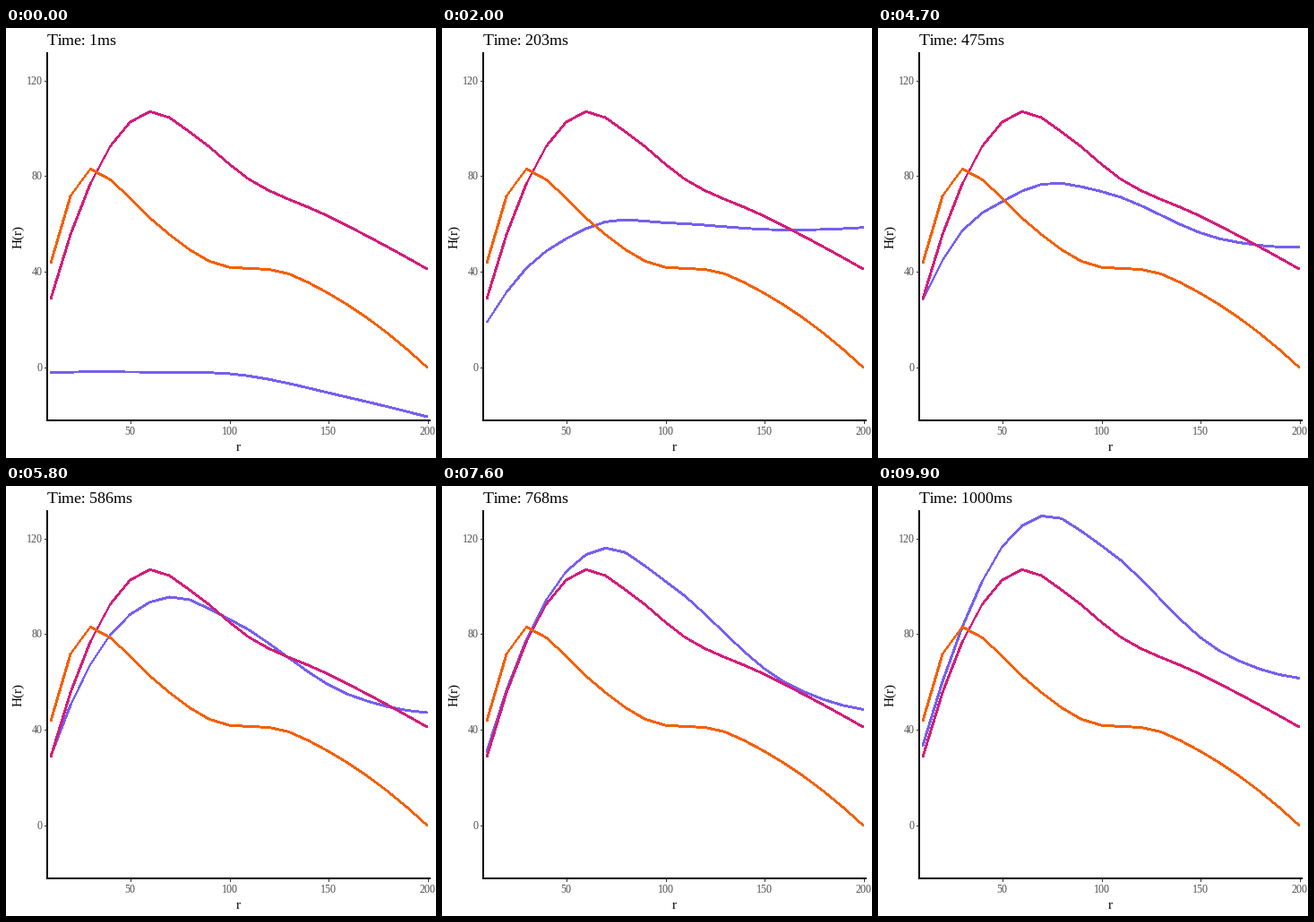
These frames come from a looping animation (480 by 480 pixels, 10000 ms). A matplotlib script:

```python
import numpy as np
import matplotlib.pyplot as plt
from matplotlib.animation import FuncAnimation
from matplotlib.collections import LineCollection

SIZE, DPI, FRAMES = 480, 80, 100
PX = 72 / DPI  # points per pixel
PINK, ORANGE, VIOLET = "#D21E7A", "#F46000", "#7560F0"

plt.rcParams.update({
    "font.family": "Liberation Serif",
    "text.hinting": "native",
    "text.hinting_factor": 1,
})

radii = np.arange(10, 201, 10)

# Key points (r, H) of the two fixed curves
pink_keys = [(10, 28.6), (20, 55.6), (40, 92.3), (60, 106.8), (80, 98.3),
             (110, 78.5), (150, 63.1), (200, 41)]
orange_keys = [(10, 43.6), (20, 71.7), (30, 82.8), (40, 78.3), (60, 62.3),
               (90, 44.2), (130, 39), (150, 30.9), (200, -0.1)]

# Violet poses: frame -> H at each knot, blended linearly in time
knots = [10, 30, 50, 70, 100, 160, 200]
poses = {
    0: [-2.4, -2, -2.1, -2.2, -2.8, -12.7, -20.8],
    20: [18.7, 41.4, 53.6, 60.7, 60.3, 57.3, 58.3],
    32: [22.5, 49.6, 68.7, 77.5, 75.3, 55.4, 55.1],
    47: [28.2, 57.1, 69.1, 76.4, 73.4, 53.6, 50],
    68: [29.8, 76.4, 105.2, 112.5, 97.6, 55.6, 44.2],
    84: [31.8, 78.8, 106.7, 119.1, 106.4, 64.2, 52.4],
    99: [33.3, 83, 116.3, 129.2, 116.9, 72.7, 61.4],
}


def to_x(r):
    return 28 + 2.21 * np.asarray(r)


def to_y(h):
    return 378.4 - 2.67 * np.asarray(h)


def smooth(xk, yk, x):
    """Cubic Hermite curve through the key points."""
    xk, yk = np.asarray(xk, float), np.asarray(yk, float)
    m = np.gradient(yk, xk, edge_order=2)
    i = np.clip(np.searchsorted(xk, x, side="right") - 1, 0, len(xk) - 2)
    w = xk[i + 1] - xk[i]
    t = (x - xk[i]) / w
    ease = t * t * (3 - 2 * t)
    return (yk[i] + (yk[i + 1] - yk[i]) * ease
            + w * t * (1 - t) * (m[i] * (1 - t) - m[i + 1] * t))


def violet_at(k):
    now = [np.interp(k, list(poses), track) for track in zip(*poses.values())]
    return smooth(knots, now, radii)


def set_curve(lines, h):
    pts = np.column_stack([to_x(radii), to_y(h)])
    dx, dy = np.abs(np.diff(pts, axis=0)).T
    # Pen two pixels thick along one axis; steep diagonals become hairlines
    width = 1.9 * np.maximum(dx, dy) / np.hypot(dx, dy)
    width[(dy > 1.3 * dx) & (dy < 2.2 * dx)] = 1
    lines.set_segments(np.stack([pts[:-1], pts[1:]], axis=1))
    lines.set_linewidths(width * PX)


fig = plt.figure(figsize=(SIZE / DPI, SIZE / DPI), dpi=DPI, facecolor="white")
ax = fig.add_axes([0, 0, 1, 1])
ax.set_xlim(0, SIZE)
ax.set_ylim(SIZE, 0)
ax.axis("off")


def curve(color, z):
    lines = LineCollection([], colors=color, antialiaseds=False,
                           capstyle="round", zorder=z)
    ax.add_collection(lines, autolim=False)
    return lines


def rule(xs, ys, width, color):
    ax.plot(xs, ys, color=color, lw=width * PX, antialiased=False,
            solid_capstyle="butt", zorder=5)


def label(x, y, s, px, color="black", ha="center", va="baseline", **kw):
    return ax.text(x, y, s, fontsize=px * PX, color=color, ha=ha, va=va, **kw)


violet = curve(VIOLET, 2)
set_curve(curve(PINK, 3), smooth(*zip(*pink_keys), radii))
set_curve(curve(ORANGE, 4), smooth(*zip(*orange_keys), radii))

rule([46, 46], [27, 439], 2, "black")
rule([45, 474], [438, 438], 2, "black")

for r in range(50, 201, 50):
    x = np.floor(to_x(r)) + 0.5
    rule([x, x], [439, 441], 1, "#333333")
    label(x, 454, str(r), 12, "#4D4D4D")
for h in range(0, 121, 40):
    y = np.floor(to_y(h)) + 0.5
    rule([43, 45], [y, y], 1, "#333333")
    label(41, y + 4.5, str(h), 12, "#4D4D4D", "right")

label(259.5, 472, "r", 15)
label(21, 233.5, "H(r)", 15, ha="right", va="center", rotation=90)
title = label(46, 19, "", 18, ha="left")


def update(k):
    set_curve(violet, violet_at(k))
    title.set_text(f"Time: {round(1 + 999 * k / (FRAMES - 1))}ms")
    return violet, title


anim = FuncAnimation(fig, update, frames=FRAMES, interval=100,
                     repeat=True, repeat_delay=0, blit=False)
plt.show()
```
